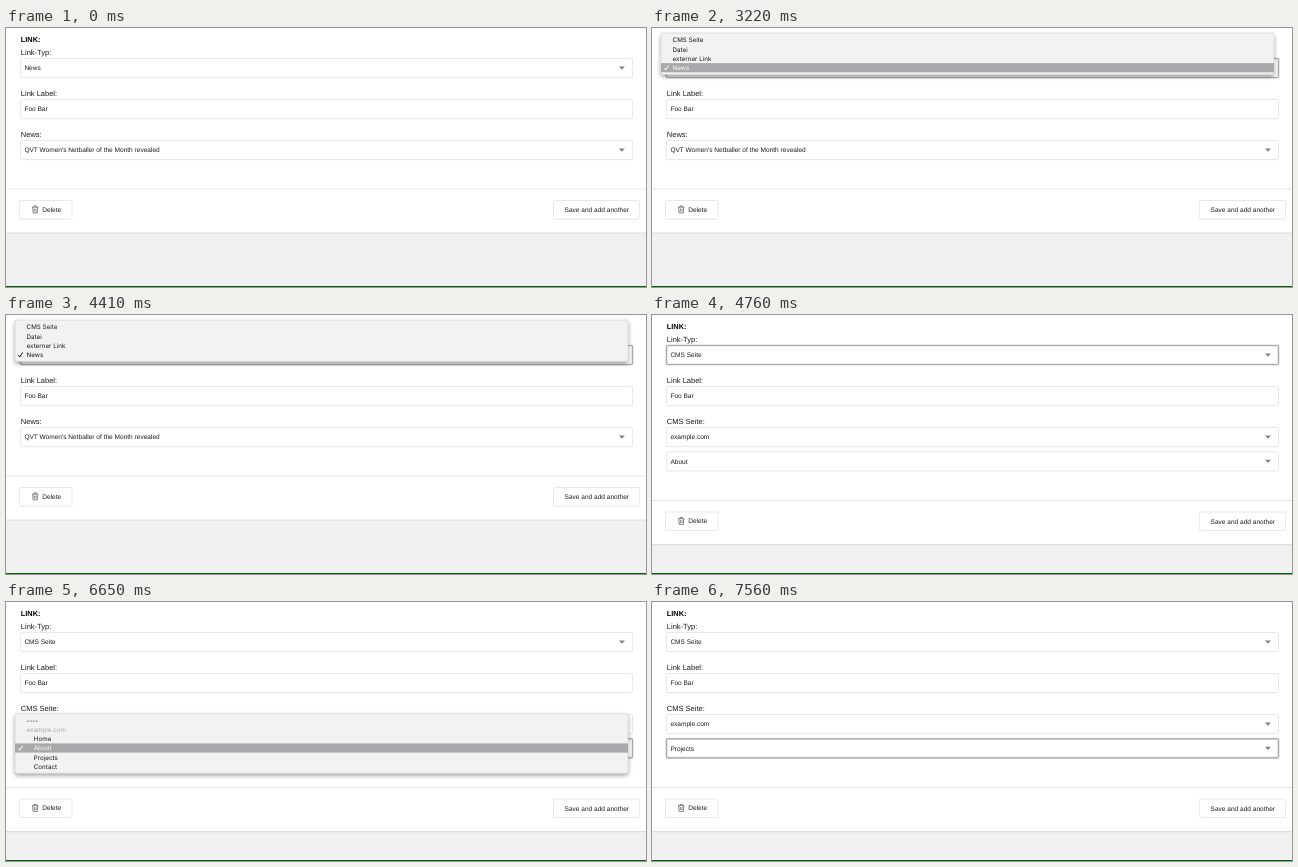
Animation, 640 px wide and 259 px high, one loop 8 s. Source, as an HTML page:

```html
<!DOCTYPE html>
<html lang="de">
<head>
<meta charset="utf-8">
<title>Link form</title>
<style>
  html, body { margin: 0; width: 100%; height: 100%; overflow: hidden; background: #f1f1f1; }
  svg { display: block; width: 640px; height: 259px; }
  text { font: 6.55px "Liberation Sans", Arial, sans-serif; fill: #1c1c1c; text-rendering: geometricPrecision; white-space: pre; }
  .label { font-size: 7.5px; }
  .title { font-size: 7.4px; font-weight: bold; fill: #000; }
  .box { fill: #fff; stroke: #e9e9e9; }
  .ring { fill: none; stroke: #a9a9a9; }
  .glow { fill: none; stroke: #bbb; stroke-width: 2.2; opacity: .5; }
  .menu text { font: 6.25px Inter, "Liberation Sans", sans-serif; fill: #161616; }
  .menu .group { fill: #aaa; }
  .menu .on text { fill: #fff; }
  .bar { fill: #a9a8ab; visibility: hidden; }
  .on .bar { visibility: visible; }
  .tick { fill: none; stroke: #161616; stroke-width: 1; }
  .on .tick { stroke: #fff; }
  .icon { fill: none; stroke: #555; stroke-width: .7; }
</style>
</head>
<body>
<svg id="stage" viewBox="0 0 640 259"></svg>
<script>
const NS = "http://www.w3.org/2000/svg";
const stage = document.getElementById("stage");
const LOOP = 8000;
const ROW = 9.2;

function add(parent, tag, attrs = {}, content) {
  const el = document.createElementNS(NS, tag);
  for (const key in attrs) el.setAttribute(key, attrs[key]);
  if (content) el.textContent = content;
  parent.append(el);
  return el;
}
const group = (parent, attrs) => add(parent, "g", attrs);
const rect = (parent, x, y, width, height, attrs) => add(parent, "rect", { x, y, width, height, ...attrs });
const text = (parent, x, y, content, cls = "") => add(parent, "text", { x, y, class: cls }, content);
const show = (el, on) => el.setAttribute("visibility", on ? "visible" : "hidden");

function field(parent, y, value, isSelect = true) {
  rect(parent, 14.5, y + 1, 612, 19.2, { rx: 1.5, fill: "#f0f0f0" });
  rect(parent, 14.5, y + .5, 612, 19, { rx: 1.5, class: "box" });
  if (isSelect) add(parent, "path", { d: `M612.9 ${y + 8.4}h6l-3 3.4z`, fill: "#828282" });
  return text(parent, 18.4, y + 12.2, value);
}

function focusRing(y) {
  const g = group(stage);
  rect(g, 14.5, y + .5, 612, 19, { rx: 1, class: "glow" });
  rect(g, 14.5, y + .5, 612, 19, { rx: 1, class: "ring" });
  return g;
}

function button(parent, x, width) {
  rect(parent, x, 173, width, 18.6, { rx: 1.5, fill: "#eee" });
  rect(parent, x, 172.5, width, 18.5, { rx: 1.5, class: "box" });
}

function menu(top, items) {
  const g = group(stage, { class: "menu" });
  rect(g, 9, top, 613, items.length * ROW + 4.6, { rx: 2.5, fill: "#f2f2f2", stroke: "#c4c4c4", "stroke-width": .5, filter: "url(#shade)" });
  const rows = items.map(([label, indent = 0, cls = "", ticked], i) => {
    const y = top + 2.4 + i * ROW;
    const row = group(g);
    rect(row, 9, y, 613, ROW, { class: "bar" });
    if (ticked) add(row, "path", { d: `M12.2 ${y + 4.9}l1.6 2 2.8-4.6`, class: "tick" });
    text(row, 20.6 + indent, y + 6.9, label, cls);
    return row;
  });
  return (opacity, active) => {
    g.setAttribute("opacity", opacity);
    show(g, opacity > 0);
    rows.forEach((row, i) => row.setAttribute("class", i === active ? "on" : ""));
  };
}

const defs = add(stage, "defs");
const shade = add(defs, "filter", { id: "shade", filterUnits: "userSpaceOnUse", x: -10, y: -10, width: 660, height: 280 });
add(shade, "feDropShadow", { dx: 0, dy: 2, stdDeviation: 2.2, "flood-color": "#000", "flood-opacity": .38 });

// Page
rect(stage, 0, 0, 640, 259, { fill: "#f1f1f1" });
const footer = group(stage);
rect(footer, 0, -30, 640, 236.2, { fill: "#e8e8e8" });
rect(footer, 0, -30, 640, 235.4, { fill: "#dedede" });
rect(footer, 0, -30, 640, 234.5, { fill: "#fff" });
rect(footer, 0, 160.5, 640, 1, { fill: "#e8e8e8" });
button(footer, 13.5, 52.5);
button(footer, 547.5, 86);
add(footer, "path", { class: "icon", d: "M26 179.2h6.4M28 179v-1.1h2.4v1.1M26.7 179.3l.4 5.6h4.2l.4-5.6M28.4 180.6v3M30 180.6v3" });
text(footer, 36.3, 183.6, "Delete");
text(footer, 558.6, 184, "Save and add another");
rect(stage, 0, 258, 640, 1, { fill: "#006400" });

// Form
text(stage, 14.8, 14, "LINK:", "title");
text(stage, 14.8, 27, "Link-Typ:", "label");
const typeValue = field(stage, 30, "News");
text(stage, 14.8, 68, "Link Label:", "label");
field(stage, 71, "Foo Bar", false);
const targetLabel = text(stage, 14.8, 109, "News:", "label");
const targetValue = field(stage, 112, "");
const pageField = group(stage);
const pageValue = field(pageField, 136.3, "About");

const typeRing = focusRing(30);
const pageRing = focusRing(136.3);
const typeMenu = menu(5.1, [["CMS Seite"], ["Datei"], ["externer Link"], ["News", 0, "", true]]);
const pageMenu = menu(111.4, [
  ["----"], ["example.com", 0, "group"], ["Home", 7.2],
  ["About", 7.2, "", true], ["Projects", 7.2], ["Contact", 7.2]
]);

// Each step: start time, menu opacity, highlighted row
const typeSteps = [
  [0, 0, -1], [3220, 1, 3], [3780, 1, 2], [3850, 1, 1], [3990, 1, 0], [4410, 1, -1],
  [4480, 1, 0], [4550, .75, 0], [4620, .45, 0], [4690, .18, 0], [4760, 0, -1]
];
const pageSteps = [
  [0, 0, -1], [6160, 1, 3], [6790, 1, 4], [6930, 1, -1], [7000, 1, 4],
  [7070, .75, 4], [7140, .45, 4], [7210, .18, 4], [7280, 0, -1]
];
const stepAt = (steps, t) => steps.findLast(step => t >= step[0]);

function draw(t) {
  const isPage = t >= 4760;
  typeValue.textContent = isPage ? "CMS Seite" : "News";
  targetLabel.textContent = isPage ? "CMS Seite:" : "News:";
  targetValue.textContent = isPage ? "example.com" : "QVT Women's Netballer of the Month revealed";
  pageValue.textContent = t >= 7280 ? "Projects" : "About";
  footer.setAttribute("transform", `translate(0 ${isPage ? 24.5 : 0})`);
  show(pageField, isPage);
  show(typeRing, t >= 3220 && t < 6160);
  show(pageRing, t >= 6160);
  typeMenu(...stepAt(typeSteps, t).slice(1));
  pageMenu(...stepAt(pageSteps, t).slice(1));
}

const start = performance.now();
function tick() {
  draw((performance.now() - start) % LOOP);
  requestAnimationFrame(tick);
}
tick();
</script>
</body>
</html>
```
